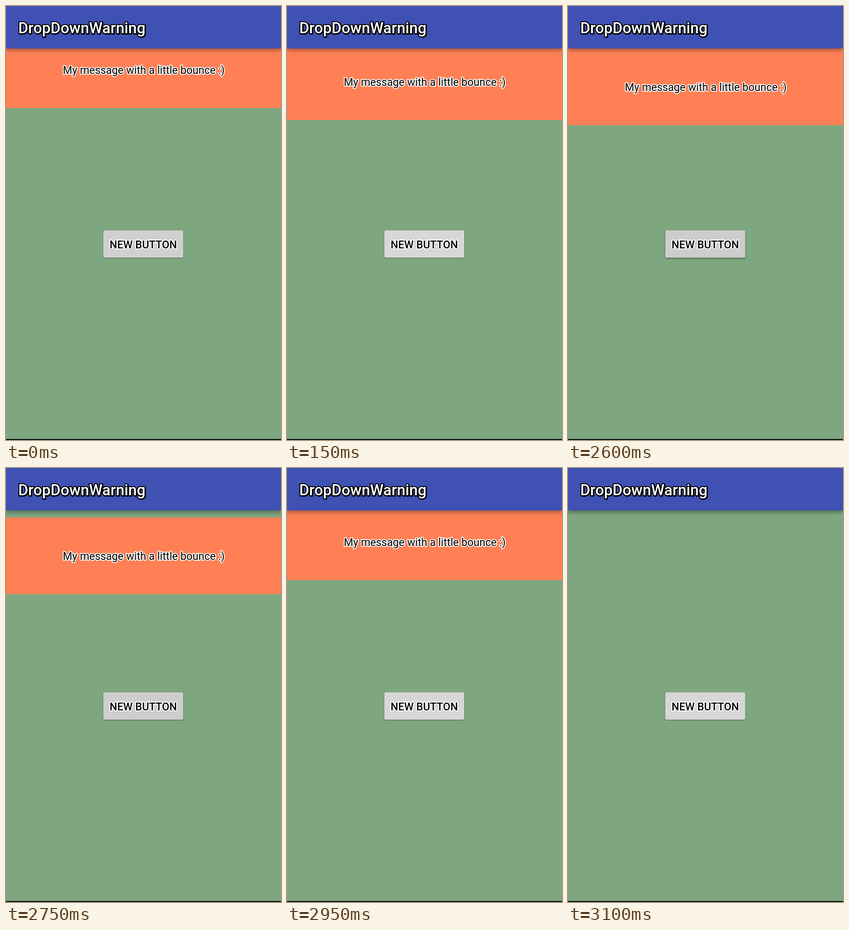
Animation of 596x940 px, one loop 4.2 s. Source, as an HTML page:

```html
<!DOCTYPE html>
<html lang="en">
<head>
<meta charset="utf-8">
<title>DropDownWarning</title>
<style>
html, body { margin: 0; width: 100%; height: 100%; overflow: hidden; background: #7fa77f; }
svg { display: block; width: 596px; height: 940px; }
text { font: 23.2px Roboto, sans-serif; paint-order: stroke; stroke: #fff; stroke-width: 4px; stroke-linejoin: round; text-anchor: middle; }
#title { font-size: 33.1px; font-weight: 500; fill: #fff; stroke: #000; text-anchor: start; filter: drop-shadow(1px 1px 0 #000); }
#label { font-weight: 500; }
#bar { filter: drop-shadow(0 4px 5px rgba(0, 0, 0, .36)); }
</style>
</head>
<body>
<svg viewBox="0 0 596 940">
  <rect width="596" height="940" fill="#7fa77f"/>
  <rect id="button" x="211" y="486" width="173" height="59" rx="3"/>
  <text id="label" x="297.5" y="524.5">NEW BUTTON</text>
  <g id="panel">
    <rect y="92" width="596" height="166" fill="#ff8055"/>
    <text x="298.5" y="184">My message with a little bounce :)</text>
  </g>
  <rect id="bar" width="596" height="92" fill="#3f51b3"/>
  <text id="title" x="26.5" y="59">DropDownWarning</text>
  <rect y="938" width="596" height="2"/>
</svg>
<script>
const LOOP = 4200, STEP = 50, HEIGHT = 166;
const SHOW_CLICK = -200, HIDE_CLICK = 2600;
const panel = document.getElementById('panel');
const button = document.getElementById('button');
const clamp = x => Math.min(1, Math.max(0, x));

function bounce(x) {
  x *= 1.1226;
  const arc = (mid, base) => 8 * (x - mid) ** 2 + base;
  if (x < .3535) return arc(0, 0);
  if (x < .7408) return arc(.54719, .7);
  if (x < .9644) return arc(.8526, .9);
  return arc(1.0435, .95);
}

const anticipate = x => x * x * (3 * x - 2);

function draw(t) {
  const shown = bounce(clamp((t - SHOW_CLICK) / 500));
  const hidden = anticipate(clamp((t - HIDE_CLICK - 20) / 455));
  const y = Math.round(HEIGHT * (shown - 1 - hidden));
  panel.setAttribute('transform', `translate(0 ${y})`);

  // Pressed tint and raised shadow fade after each click.
  const age = t - (t < HIDE_CLICK ? SHOW_CLICK : HIDE_CLICK);
  const grey = Math.round(205 + 10 * clamp((age - 130) / 220));
  const lift = 1 - clamp((age - 50) / 150);
  button.style.fill = `rgb(${grey}, ${grey}, ${grey})`;
  button.style.filter = `drop-shadow(0 ${1 + lift}px ${1 + lift}px rgba(0, 0, 0, .35))`;
}

function tick(now) {
  draw(Math.floor(now % LOOP / STEP) * STEP);
  requestAnimationFrame(tick);
}
draw(0);
requestAnimationFrame(tick);
</script>
</body>
</html>
```
